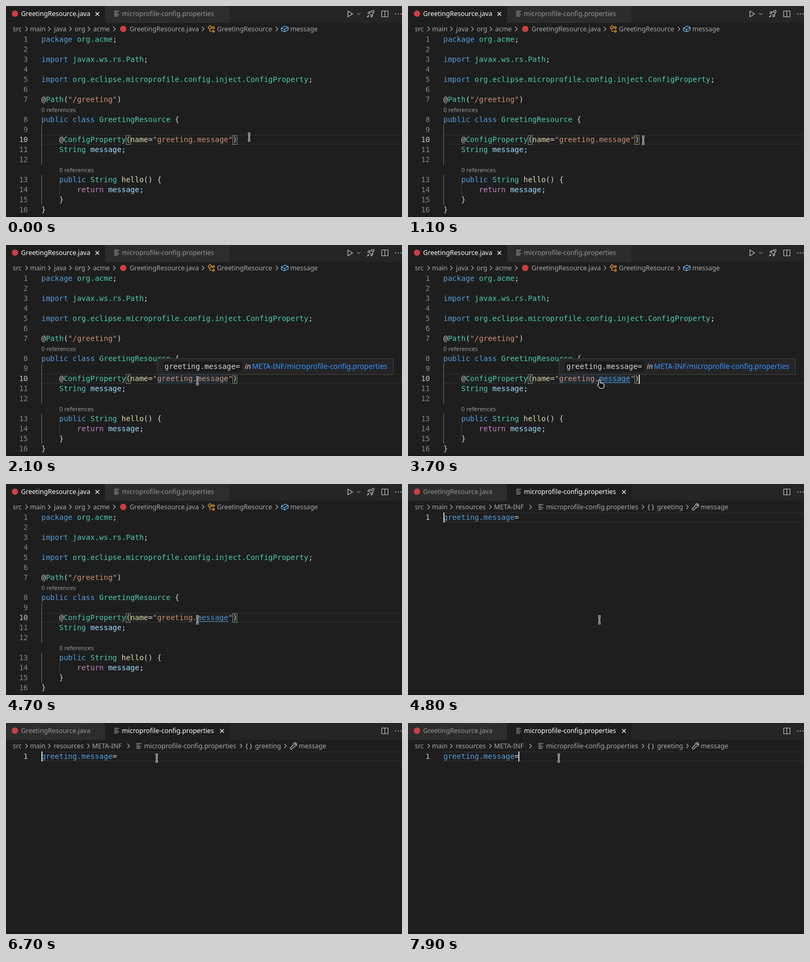
These frames come from a looping animation (750 px wide and 400 px high, 8000 ms). An HTML page with a canvas:

```html
<!DOCTYPE html>
<html lang="en">
<head>
<meta charset="utf-8">
<title>Jump from a Java property to its configuration</title>
<style>
html, body { margin: 0; width: 100%; height: 100%; overflow: hidden; background: #1e1e1e; }
canvas { display: block; }
</style>
</head>
<body>
<canvas id="stage" width="750" height="400"></canvas>
<script>
const ctx = document.getElementById('stage').getContext('2d');
const LOOP = 8000, STEP = 100, LEFT = 67, LINE = 19, CHAR = 8.428;
const MONO = '14px "DejaVu Sans Mono", monospace';
const UI = '12.4px "Noto Sans", sans-serif';
const LENS = '11.3px "Noto Sans", sans-serif';
const HOVER = '13.5px "Noto Sans", sans-serif';
const COLORS = { k: '#569cd6', t: '#4ec9b0', d: '#d4d4d4', s: '#ce9178', f: '#dcdcaa', v: '#9cdcfe', c: '#c586c0', l: '#4e94ce' };
const CRUMB = '#a9a9a9', ICON = '#c5c5c5', RED = '#cc3e44';

// Each segment starts with its colour key; an empty row number marks a code lens.
const JAVA = [
  [1, 'kpackage |torg.acme|d;'], [2, ''],
  [3, 'kimport |tjavax.ws.rs.Path|d;'], [4, ''],
  [5, 'kimport |torg.eclipse.microprofile.config.inject.ConfigProperty|d;'], [6, ''],
  [7, 'd@|tPath|d(|s"/greeting"|d)'],
  ['', LEFT],
  [8, 'kpublic class |tGreetingResource|d {'], [9, ''],
  [10, 'd    @|tConfigProperty|d(|fname|d=|s"greeting.message"|d)'],
  [11, 't    String |vmessage|d;'], [12, ''],
  ['', 101],
  [13, 'k    public |tString |fhello|d() {'],
  [14, 'c        return |vmessage|d;'],
  [15, 'd    }'], [16, 'd}']
];
const PROPERTY = 'kgreeting.message|d=';

function rect(x, y, w, h, color) {
  ctx.fillStyle = color;
  ctx.fillRect(x, y, w, h);
}
function frame(x, y, w, h, color) {
  ctx.strokeStyle = color;
  ctx.lineWidth = 1;
  ctx.strokeRect(x + .5, y + .5, w - 1, h - 1);
}
function text(str, x, y, font, color, align = 'left') {
  ctx.font = font;
  ctx.fillStyle = color;
  ctx.textAlign = align;
  ctx.fillText(str, x, y);
}
function stroke(d, color, width = 1, x = 0, y = 0) {
  ctx.save();
  ctx.translate(x, y);
  ctx.strokeStyle = color;
  ctx.lineWidth = width;
  ctx.stroke(new Path2D(d));
  ctx.restore();
}
function dot(x, y, r, color) {
  ctx.fillStyle = color;
  ctx.beginPath();
  ctx.arc(x, y, r, 0, 7);
  ctx.fill();
}
function code(spec, x, y) {
  for (const part of spec.split('|')) {
    text(part.slice(1), x, y, MONO, COLORS[part[0]]);
    x += (part.length - 1) * CHAR;
  }
}

const listIcon = (x, y) => stroke('M0 -3.5h9M0 -.5h6M0 2.5h9M0 5.5h7', ICON, 1, x, y);
const closeIcon = x => stroke('M-3.5 -3.5l7 7m0 -7l-7 7', '#fff', 1.2, x, 15);
const chevron = x => stroke('M-2 -4l4 4l-4 4', CRUMB, 1.1, x, 43.5);

function tabs(javaActive) {
  rect(0, 0, 750, 32, '#252526');
  rect(0, 0, 187, 32, javaActive ? '#1e1e1e' : '#2d2d2d');
  rect(188, 0, 235, 32, javaActive ? '#2d2d2d' : '#1e1e1e');
  const shade = active => active ? '#fff' : '#969696';
  dot(17, 14.5, 6, RED);
  text('GreetingResource.java', 28.5, 19, UI, shade(javaActive));
  listIcon(205, 13.5);
  text('microprofile-config.properties', 219.5, 19, UI, shade(!javaActive));
  closeIcon(javaActive ? 173 : 409);
  if (javaActive) {
    stroke('M647.5 9.5v11l9 -5.5z', ICON, 1.2);
    stroke('M665 13.5l3 3l3 -3', ICON);
    stroke('M688 14c2 -4 5 -5.500 9 -5.500c0 4 -1.500 7 -5.500 9.500zM688 14h-3l2 -3h3M691.500 18v3l3 -2v-3M687 17l-3 4l4 -2', ICON, 1.1);
    dot(693.5, 12, 1.2, ICON);
  }
  stroke('M711.500 9.500h12v11h-12zM717.500 9.500v11', ICON, 1.1);
  for (const x of [738, 743, 748]) dot(x, 15, 1.1, ICON);
}

function crumbs(items, arrows) {
  for (const [label, x] of items) text(label, x, 48, UI, CRUMB);
  arrows.forEach(chevron);
}

function currentLine(y) {
  rect(LEFT, y, 683, LINE, '#282828');
  rect(LEFT, y + 2, 683, LINE - 4, '#1e1e1e');
}
const caret = (x, y) => rect(x, y, 2, LINE, '#d0d0d0');

function tooltip(alpha, preview) {
  ctx.save();
  ctx.globalAlpha = alpha;
  const top = preview ? 187 : 215;
  rect(286, top, 448, 246 - top, '#252526');
  frame(286, top, 448, 246 - top, '#454545');
  if (preview) {
    code(PROPERTY, 295, 206);
    rect(287, 215, 446, 1, '#454545');
  }
  ctx.fillStyle = 'rgba(10,10,10,.4)';
  ctx.beginPath();
  ctx.roundRect(297, 221, 150, 19, 3);
  ctx.fill();
  text('greeting.message=', 300, 235, MONO, '#d4d4d4');
  text('in', 452.5, 235, 'italic ' + HOVER, '#ccc');
  text('META-INF/microprofile-config.properties', 466, 235, HOVER, '#3794ff');
  ctx.restore();
}

function javaEditor(t) {
  crumbs([['src', 13], ['main', 45.5], ['java', 91], ['org', 130], ['acme', 165], ['GreetingResource.java', 234],
    ['GreetingResource', 399.5], ['message', 538.5]], [39, 82, 122, 157, 205, 373, 513]);
  dot(222, 43.5, 6, RED);
  stroke('M382.500 41l4 -4l3 3l-4 4zM388 42h3M386 44v4h5M391 41l2 -2l2 2l-2 2zM391 48l2 -2l2 2l-2 2z', '#ee9d28', 1.2);
  stroke('M521.500 42l7 -4l6 2.500v5l-7 3.500l-6 -2.500zl6 2.500l7 -4M527.500 44.500v4.500', '#75beff', 1.2);

  currentLine(244);
  const hovering = t >= 1800 && t < 4500, linked = t >= 3600;
  if (hovering) rect(LEFT + 26 * CHAR, 244, 16 * CHAR, LINE, 'rgba(38,79,120,.25)');
  for (const [y, h] of [[225, 76], [320, 57]]) rect(LEFT, y, 1, h, '#707070');
  rect(101, 339, 1, LINE, '#404040');
  for (const col of [19, 43]) {
    const x = Math.round(LEFT + col * CHAR);
    rect(x, 245, 9, 18, 'rgba(0,100,0,.1)');
    frame(x, 245, 9, 18, '#888');
  }
  JAVA.forEach(([number, content], i) => {
    const y = 68 + i * LINE;
    if (!number) return text('0 references', content, y + 133 - 133, LENS, '#999');
    text(number, 41.5, y, MONO, number === 10 ? '#c6c6c6' : '#858585', 'right');
    if (number === 10 && linked) {
      code('d    @|tConfigProperty|d(|fname|d=|s"greeting.|lmessage|s"|d)', LEFT, y);
      rect(LEFT + 35 * CHAR, y + 2, 7 * CHAR, 1, COLORS.l);
    } else if (content) code(content, LEFT, y);
  });
  if (t >= 600 && t < 4100 && (t - 600) % 1000 < 500 && !(t >= 2600 && t < 2900)) caret(437, 244);
  if (hovering) tooltip(Math.min(1, .15 + (t - 1800) / 350), t >= 4000);
}

function propertiesEditor(t) {
  crumbs([['src', 13], ['main', 45.5], ['resources', 90.5], ['META-INF', 163], ['microprofile-config.properties', 261.5],
    ['greeting', 471.5], ['message', 554.5]], [39, 82, 156, 232, 445, 529]);
  listIcon(247, 42.5);
  text('{ }', 453.5, 48, UI, ICON);
  stroke('M538.500 47l5.500 -5.500c-1 -3 2 -5.500 5 -4l-2.500 2.500l1.500 1.500l2.500 -2.500c1.500 3 -1 6 -4 5l-5.500 5.500c-2 1 -3.500 -1 -2.500 -2.500z', ICON, 1.1);
  currentLine(54);
  text('1', 41.5, 68, MONO, '#c6c6c6', 'right');
  code(PROPERTY, LEFT, 68);
  const blinkOn = t < 5200 || (t >= 5700 && t < 6200) || (t >= 6700 && t < 7300) || t >= 7900;
  if (blinkOn) caret(t < 6900 ? LEFT : 209, 54);
}

// Eased progress from 0 to 1 between two times.
function ease(t, from, to) {
  const p = Math.max(0, Math.min(1, (t - from) / (to - from)));
  return p * p * (3 - 2 * p);
}

function pointer(t) {
  const a = ease(t, 900, 1700), b = ease(t, 5000, 5500);
  let x = 460.5 - 98 * a - 77 * b;
  let y = 248.5 + 9 * a + 9 * Math.sin(Math.PI * a) - 196 * b;
  if (t >= 6100) y += 1;
  if (t >= 6400) y += t < 6500 ? 2 : 4;
  x = Math.floor(x) + .5;
  y = Math.floor(y) + .5;
  ctx.lineJoin = 'round';
  if (t >= 3600 && t < 4700) {
    const hand = new Path2D('M-1.500 7V-.5a1.500 1.500 0 0 1 3 0V4l6 1.500q1.500 .5 1.500 2V10q0 3 -2 4H1l-4 -5q-1 -2 .5 -2z');
    ctx.save();
    ctx.translate(x, y + (t >= 4000 && t < 4100 ? 4 : 0));
    ctx.fillStyle = '#000';
    ctx.fill(hand);
    ctx.restore();
    stroke('M-1.500 7V-.5a1.500 1.500 0 0 1 3 0V4l6 1.500q1.500 .5 1.500 2V10q0 3 -2 4H1l-4 -5q-1 -2 .5 -2z', '#fff', 1.2, x, y + (t >= 4000 && t < 4100 ? 4 : 0));
  } else {
    const beam = 'M-2.500 -7h5M-2.500 7h5M0 -7v14';
    stroke(beam, '#fff', 3, x, y);
    stroke(beam, '#000', 1, x, y);
  }
}

function draw(now) {
  const t = Math.floor(now % LOOP / STEP) * STEP;
  const inJava = t < 4800;
  rect(0, 0, 750, 400, '#1e1e1e');
  tabs(inJava);
  (inJava ? javaEditor : propertiesEditor)(t);
  rect(0, 398, 750, 2, '#191919');
  pointer(t);
}

const start = performance.now();
function tick() {
  draw(performance.now() - start);
  requestAnimationFrame(tick);
}
tick();
</script>
</body>
</html>
```
